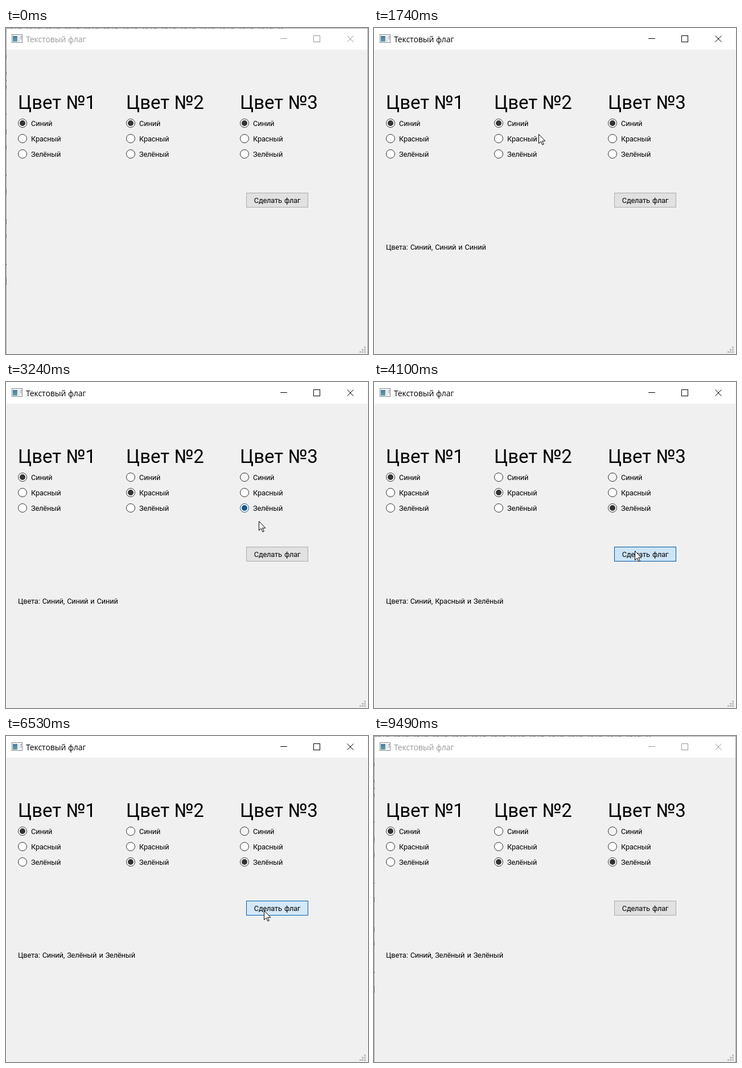
These frames come from a looping animation (636 by 572 pixels, 9650 ms). An HTML page:

```html
<!DOCTYPE html>
<html lang="ru">
<head>
<meta charset="utf-8">
<title>Текстовый флаг</title>
<style>
html, body { margin: 0; width: 100%; height: 100%; overflow: hidden; background: #f0f0f0; }
svg { display: block; width: 636px; height: 572px; }
text { font: 12.8px Roboto, "Liberation Sans", sans-serif; letter-spacing: -.15px; word-spacing: 1px; fill: #000; }
.head { font-size: 33px; letter-spacing: 0; word-spacing: 0; }
.title { font: 14px "Open Sans", "Noto Sans", sans-serif; letter-spacing: -.05px; word-spacing: 0; fill: currentColor; }
.crisp { shape-rendering: crispEdges; }
.radio { color: #333; }
.ring { fill: #fff; stroke: currentColor; }
.dot { fill: currentColor; }
.off { opacity: 0; }

.chrome, .idle, .radio, .dot, .ring, .btn, .note, .cursor {
  animation: 9.65s linear infinite;
}

/* window focus */
.chrome { animation-name: chrome; animation-timing-function: step-end; }
@keyframes chrome { 0%, 98.33% { color: #999; } 2.27% { color: #000; } 100% { color: #999; } }
.idle { animation-name: idle; animation-timing-function: step-end; }
@keyframes idle { 0%, 98.33% { opacity: 1; } 2.27% { opacity: 0; } 100% { opacity: 1; } }

/* radio hover */
.blue2 { animation-name: blue2; }
@keyframes blue2 { 0%, 50.8%, 57.4%, 100% { color: #333; } 52.2%, 55.4% { color: #0078d7; } }
.red2 { animation-name: red2; }
@keyframes red2 { 0%, 18.9%, 25.6%, 57%, 58.8%, 100% { color: #333; } 20.5%, 23.4% { color: #0078d7; } 57.6% { color: #1d5180; } }
.green2 { animation-name: green2; }
@keyframes green2 { 0%, 57.6%, 64.6%, 100% { color: #333; } 59.3%, 62% { color: #0078d7; } }
.green3 { animation-name: green3; }
@keyframes green3 { 0%, 25.6%, 35.4%, 100% { color: #333; } 28.6%, 32% { color: #0078d7; } }

/* radio choice */
.blue2 .dot { animation-name: dotBlue2; }
@keyframes dotBlue2 { 0%, 21.5% { opacity: 1; } 22.38%, 100% { opacity: 0; } }
.red2 .dot { animation-name: dotRed2; }
@keyframes dotRed2 { 0%, 21.5% { opacity: 0; } 22.38%, 61% { opacity: 1; } 62.6%, 100% { opacity: 0; } }
.green2 .dot { animation-name: dotGreen2; }
@keyframes dotGreen2 { 0%, 61% { opacity: 0; } 62.2%, 100% { opacity: 1; } }
.blue3 .dot { animation-name: dotBlue3; }
@keyframes dotBlue3 { 0%, 31.8% { opacity: 1; } 33.4%, 100% { opacity: 0; } }
.blue3 .ring { animation-name: ringBlue3; }
@keyframes ringBlue3 { 0%, 31.8% { fill: #fff; } 33.4%, 100% { fill: #f3f3f3; } }
.green3 .dot { animation-name: dotGreen3; }
@keyframes dotGreen3 { 0%, 31.8% { opacity: 0; } 32.6%, 100% { opacity: 1; } }

/* button: rest, hover, pressed */
.btn { fill: #e1e1e1; stroke: #adadad; animation-name: btn; }
@keyframes btn {
  0%, 8.8%, 15.6%, 37%, 45.8%, 62.4%, 78.9%, 100% { fill: #e1e1e1; stroke: #adadad; }
  10.2%, 12.95%, 39.5%, 40.6%, 43.4%, 64.8%, 66%, 69.4%, 75.74% { fill: #e5f1fb; stroke: #0078d7; }
  10.8%, 11.3%, 41.4%, 42.5%, 66.4%, 66.9% { fill: #cce4f7; stroke: #005499; }
}

/* result line */
.note { opacity: 0; animation-timing-function: step-end; }
.n1 { animation-name: n1; }
@keyframes n1 { 0%, 42.48% { opacity: 0; } 11.3% { opacity: 1; } 100% { opacity: 0; } }
.n2 { animation-name: n2; }
@keyframes n2 { 0%, 66.83% { opacity: 0; } 42.48% { opacity: 1; } 100% { opacity: 0; } }
.n3 { animation-name: n3; }
@keyframes n3 { 0% { opacity: 0; } 66.83%, 100% { opacity: 1; } }

/* pointer path, moved in steps of about 78 ms */
.cursor { animation-name: point; animation-timing-function: step-end; }
@keyframes point {
  0% { transform: translate(650px, 600px); }
  2.27% { transform: translate(610px, 570px); animation-timing-function: steps(9); }
  9.64% { transform: translate(468px, 298px); }
  12.95% { transform: translate(450px, 290px); animation-timing-function: steps(6); }
  17.66% { transform: translate(289px, 186px); animation-timing-function: steps(3); }
  19.95% { transform: translate(256px, 189px); animation-timing-function: steps(3); }
  22.38% { transform: translate(250px, 191px); }
  23.41% { transform: translate(290px, 198px); animation-timing-function: steps(3); }
  25.69% { transform: translate(434px, 232px); }
  27.14% { transform: translate(436px, 228px); animation-timing-function: steps(4); }
  30.35% { transform: translate(445px, 210px); }
  31.91% { transform: translate(446px, 222px); animation-timing-function: steps(2); }
  33.56% { transform: translate(444px, 244px); animation-timing-function: steps(5); }
  37.7% { transform: translate(455px, 288px); animation-timing-function: steps(5); }
  41.75%, 42.48% { transform: translate(458px, 296px); }
  43.28% { transform: translate(448px, 290px); animation-timing-function: steps(5); }
  47.3% { transform: translate(330px, 215px); animation-timing-function: steps(3); }
  49.7% { transform: translate(262px, 153px); animation-timing-function: steps(3); }
  52.22% { transform: translate(237px, 160px); }
  53.05% { transform: translate(235px, 160px); }
  53.88% { transform: translate(233px, 160px); }
  55.43% { transform: translate(234px, 166px); animation-timing-function: steps(5); }
  59.47%, 61.1% { transform: translate(252px, 224px); }
  61.2% { transform: translate(270px, 234px); animation-timing-function: steps(4); }
  63.9% { transform: translate(448px, 313px); animation-timing-function: steps(2); }
  65.28% { transform: translate(453px, 306px); }
  75.74% { transform: translate(453px, 335px); animation-timing-function: steps(2); }
  77.4% { transform: translate(449px, 427px); animation-timing-function: steps(3); }
  79.78% { transform: translate(535px, 531px); }
  83.93% { transform: translate(545px, 540px); animation-timing-function: steps(2); }
  85.48%, 100% { transform: translate(558px, 580px); }
}
</style>
</head>
<body>
<svg viewBox="0 0 636 572">
  <defs>
    <linearGradient id="pane" x2="0.4" y2="1">
      <stop offset="0" stop-color="#3d74a3"/><stop offset="1" stop-color="#5f9fa8"/>
    </linearGradient>
  </defs>

  <rect width="636" height="572" fill="#f0f0f0"/>
  <rect width="636" height="38" fill="#fff"/>
  <path class="crisp" d="M.5 0V572M635.5 0V572" stroke="#fafafa"/>

  <g class="idle crisp" fill="none">
    <path d="M0 .5H636M.5 0V572M635.5 0V572" stroke="#a6a6a6"/>
    <path d="M2 .5H486" stroke="#666" stroke-dasharray="3 2 5 4 2 3 6 9"/>
    <path d="M.5 48v6m0 23v5m0 9v3m0 7v6m0 43v3m0 25v8m0 20v7m0 44v3m0 23v9m0 44v9m0 17v6m0 46v3m0 22v11" stroke="#444" stroke-dasharray="2 1"/>
  </g>

  <g class="crisp">
    <rect x="10.5" y="11.5" width="18" height="14" fill="#f8f8f8" stroke="#858b8f"/>
    <rect x="12" y="14" width="8" height="10" fill="url(#pane)"/>
    <rect x="21" y="14" width="4" height="10" fill="#e4e6e8"/>
    <path d="M26.5 14v6" stroke="#667" stroke-dasharray="3 1"/>
  </g>
  <g class="chrome">
    <text class="title" x="35" y="25">Текстовый флаг</text>
    <g fill="none" stroke="currentColor">
      <path class="crisp" d="M482 18.5H494M540.5 13.5H551.5V24.5H540.5Z"/>
      <path d="M599.5 13.5L610.5 24.5M610.5 13.5L599.5 24.5"/>
    </g>
  </g>

  <g transform="translate(21)">
    <text class="head" y="142">Цвет №1</text>
    <g class="radio" transform="translate(8 167)"><circle class="ring" r="7.5"/><circle class="dot" r="5"/><text x="15" y="5">Синий</text></g>
    <g class="radio" transform="translate(8 194)"><circle class="ring" r="7.5"/><text x="15" y="5">Красный</text></g>
    <g class="radio" transform="translate(8 221)"><circle class="ring" r="7.5"/><text x="15" y="5">Зелёный</text></g>
  </g>
  <g transform="translate(211)">
    <text class="head" y="142">Цвет №2</text>
    <g class="radio blue2" transform="translate(8 167)"><circle class="ring" r="7.5"/><circle class="dot" r="5"/><text x="15" y="5">Синий</text></g>
    <g class="radio red2" transform="translate(8 194)"><circle class="ring" r="7.5"/><circle class="dot off" r="5"/><text x="15" y="5">Красный</text></g>
    <g class="radio green2" transform="translate(8 221)"><circle class="ring" r="7.5"/><circle class="dot off" r="5"/><text x="15" y="5">Зелёный</text></g>
  </g>
  <g transform="translate(411)">
    <text class="head" y="142">Цвет №3</text>
    <g class="radio blue3" transform="translate(8 167)"><circle class="ring" r="7.5"/><circle class="dot" r="5"/><text x="15" y="5">Синий</text></g>
    <g class="radio" transform="translate(8 194)"><circle class="ring" r="7.5"/><text x="15" y="5">Красный</text></g>
    <g class="radio green3" transform="translate(8 221)"><circle class="ring" r="7.5"/><circle class="dot off" r="5"/><text x="15" y="5">Зелёный</text></g>
  </g>

  <rect class="btn crisp" x="422.5" y="289.5" width="108" height="25"/>
  <text x="476.5" y="307" text-anchor="middle">Сделать флаг</text>

  <text class="note n1" x="21" y="389">Цвета: Синий, Синий и Синий</text>
  <text class="note n2" x="21" y="389">Цвета: Синий, Красный и Зелёный</text>
  <text class="note n3" x="21" y="389">Цвета: Синий, Зелёный и Зелёный</text>

  <path class="crisp" fill="#bfbfbf" d="M629 559h3v3h-3zM625 563h3v3h-3zM629 563h3v3h-3zM621 567h3v3h-3zM625 567h3v3h-3zM629 567h3v3h-3z"/>

  <path class="cursor" d="M.5 .5V16.5L4.3 13L7 19L9.3 18L6.7 12.2H11.8Z" fill="#fff" stroke="#000"/>
</svg>
</body>
</html>
```
